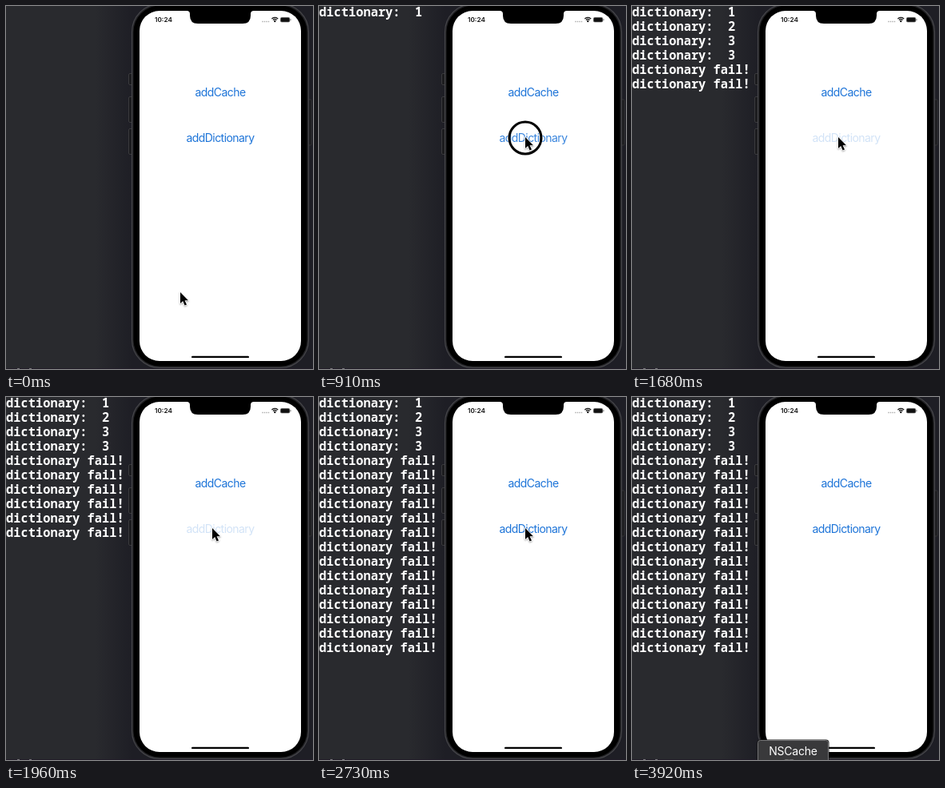
These frames come from a looping animation (384x454 px, 4410 ms). An HTML page with a canvas:

```html
<!DOCTYPE html>
<html lang="en">
<head>
<meta charset="utf-8">
<title>Cache and dictionary demo</title>
<style>
html, body { margin: 0; width: 100%; height: 100%; overflow: hidden; background: #292a2e; }
canvas { display: block; width: 384px; height: 454px; }
</style>
</head>
<body>
<canvas id="stage"></canvas>
<script>
const W = 384, H = 454, LOOP = 4410, STEP = 70;
const canvas = document.getElementById('stage');
const ctx = canvas.getContext('2d');
const dpr = window.devicePixelRatio || 1;
canvas.width = W * dpr;
canvas.height = H * dpr;
ctx.scale(dpr, dpr);

const SANS = 'Inter, "Open Sans", sans-serif';
const MONO = '"Noto Sans Mono", "DejaVu Sans Mono", monospace';
const PRESSES = [560, 910, 1260, 1540, 1820, 2100, 2310];
const HOLD = 140, FADE = 280;

const clamp = v => Math.max(0, Math.min(1, v));
const ease = v => v * v * (3 - 2 * v);
const mix = (a, b, k) => a + (b - a) * k;

function box(x, y, w, h, r, fill, stroke, line = 1) {
  ctx.beginPath();
  ctx.roundRect(x, y, w, h, r);
  if (fill) { ctx.fillStyle = fill; ctx.fill(); }
  if (stroke) { ctx.strokeStyle = stroke; ctx.lineWidth = line; ctx.stroke(); }
}

function text(str, x, y, font, color, align = 'left', spacing = 0) {
  ctx.font = font;
  ctx.letterSpacing = spacing + 'px';
  ctx.textAlign = align;
  ctx.fillStyle = color;
  ctx.fillText(str, x, y);
}

function drawBackdrop() {
  ctx.fillStyle = '#292a2e';
  ctx.fillRect(0, 0, W, H);
  const shade = ctx.createLinearGradient(112, 0, 158, 0);
  shade.addColorStop(0, 'rgba(30,30,37,0)');
  shade.addColorStop(1, 'rgba(30,30,37,1)');
  ctx.fillStyle = shade;
  ctx.fillRect(112, 0, 46, H);
  ctx.fillStyle = '#1e1e25';
  ctx.fillRect(158, 0, W - 158, H);
  ctx.fillStyle = '#211c28';
  ctx.fillRect(0, 453, W, 1);
  ctx.fillStyle = '#77747a';
  ctx.fillRect(14, 453, 3, 1);
  ctx.fillRect(29, 453, 3, 1);
}

function drawStatus() {
  text('10:24', 186, 20.3, '600 8.2px ' + SANS, '#111');
  ctx.fillStyle = '#aaa';
  for (let i = 0; i < 4; i++) ctx.fillRect(320.3 + i * 2.5, 18.8, 1.4, 1.4);

  ctx.strokeStyle = '#111';
  ctx.lineWidth = 1.3;
  for (const r of [3, 5.2]) {
    ctx.beginPath();
    ctx.arc(336.3, 19.6, r, -Math.PI * 0.77, -Math.PI * 0.23);
    ctx.stroke();
  }
  ctx.fillStyle = '#111';
  ctx.beginPath();
  ctx.arc(336.3, 19, 1.2, 0, Math.PI * 2);
  ctx.fill();

  box(343.3, 14.3, 11.6, 5.8, 1.7, '#111', '#777', 0.6);
  box(355.5, 16, 0.9, 2.4, 0.4, '#777');
}

function drawPhone() {
  for (const [y, h] of [[84, 15], [113, 33], [153, 33]])
    box(153.5, y + 0.5, 6, h - 1, 1.5, '#1b1b1e', '#3a3a3d');
  box(377, 117, 5, 57, 1.5, '#1b1b1e', '#343437');
  box(157.5, -2.5, 221, 455, 35, '#222225', '#454549', 1.2);
  box(159.5, -0.5, 217, 451, 33, '#000');
  box(167, 6, 202, 438, 25, '#fff');

  ctx.fillStyle = '#000';
  ctx.beginPath();
  ctx.moveTo(226, 5);
  ctx.lineTo(226, 6);
  ctx.quadraticCurveTo(230, 6, 230, 10);
  ctx.lineTo(230, 12);
  ctx.quadraticCurveTo(230, 22, 240, 22);
  ctx.lineTo(296, 22);
  ctx.quadraticCurveTo(306, 22, 306, 12);
  ctx.lineTo(306, 10);
  ctx.quadraticCurveTo(306, 6, 310, 6);
  ctx.lineTo(310, 5);
  ctx.fill();

  drawStatus();
  box(232, 437.7, 72, 2.4, 1.2, '#000');
}

function drawButtons(t) {
  const font = '400 14px ' + SANS, blue = '#1d74d8';
  text('addCache', 268, 113, font, blue, 'center', -0.55);
  ctx.globalAlpha = buttonAlpha(t);
  text('addDictionary', 268, 170, font, blue, 'center', -0.55);
  ctx.globalAlpha = 1;
}

function buttonAlpha(t) {
  const last = PRESSES.filter(p => p < t).pop();
  if (last === undefined) return 1;
  return mix(0.2, 1, ease(clamp((t - last - HOLD) / FADE)));
}

function lineCount(t) {
  if (t < 700) return 0;
  if (t < 1050) return 1;
  if (t < 1400) return 2;
  if (t < 1540) return 3;
  if (t < 1680) return 4;
  return Math.min(18, 6 + 2 * Math.floor((t - 1680) / 140));
}

function drawConsole(t) {
  const n = lineCount(t);
  for (let i = 0; i < n; i++) {
    const str = i < 4 ? 'dictionary:  ' + Math.min(i + 1, 3) : 'dictionary fail!';
    text(str, 0, 13 + i * 18, '700 15.4px ' + MONO, '#fff');
  }
}

function drawRing(x, y) {
  ctx.beginPath();
  ctx.arc(x, y, 21.5, 0, Math.PI * 2);
  ctx.strokeStyle = 'rgba(255,255,255,0.6)';
  ctx.lineWidth = 1;
  ctx.stroke();
  ctx.beginPath();
  ctx.arc(x, y, 20, 0, Math.PI * 2);
  ctx.strokeStyle = '#000';
  ctx.lineWidth = 3;
  ctx.stroke();
}

function drawCursor(x, y) {
  const shape = [[0, 0], [0, 14], [3.2, 11.1], [5.6, 16.5], [8, 15.4], [5.6, 10.3], [10, 10.2]];
  ctx.save();
  ctx.translate(x, y);
  ctx.beginPath();
  shape.forEach(([px, py]) => ctx.lineTo(px, py));
  ctx.closePath();
  ctx.shadowColor = 'rgba(0,0,0,0.35)';
  ctx.shadowBlur = 2 * dpr;
  ctx.shadowOffsetY = dpr;
  ctx.strokeStyle = '#fff';
  ctx.lineWidth = 1.6;
  ctx.lineJoin = 'round';
  ctx.stroke();
  ctx.shadowColor = 'transparent';
  ctx.fillStyle = '#000';
  ctx.fill();
  ctx.restore();
}

function cursorAt(t) {
  const up = ease(clamp(t / 420));
  const down = ease(clamp((t - 2730) / 420));
  return [mix(mix(218, 258, up), 240, down), mix(mix(358, 164, up), 458, down)];
}

function drawTip(str, x, w) {
  box(x - 0.5, 428.5, w + 1, 40, 4, '#111');
  box(x + 0.5, 429.5, w - 1, 40, 3, '#39393b', '#747476');
  text(str, x + w / 2, 448, '400 14px ' + SANS, '#fff', 'center', -0.2);
}

function draw(t) {
  drawBackdrop();
  drawPhone();
  drawButtons(t);
  drawConsole(t);
  if (PRESSES.some(p => t >= p && t < p + HOLD)) drawRing(258, 165);
  if (t >= 3290) drawTip('NSCache', 157, 89);
  else if (t >= 3150) drawTip('NSCache — ViewController.swift', 120, 240);
  if (t >= 3850) drawRing(196.5, 475);
  if (t < 3150) drawCursor(...cursorAt(t));
}

function tick() {
  const t = performance.now() % LOOP;
  draw(Math.floor(t / STEP) * STEP);
  requestAnimationFrame(tick);
}
tick();
</script>
</body>
</html>
```
